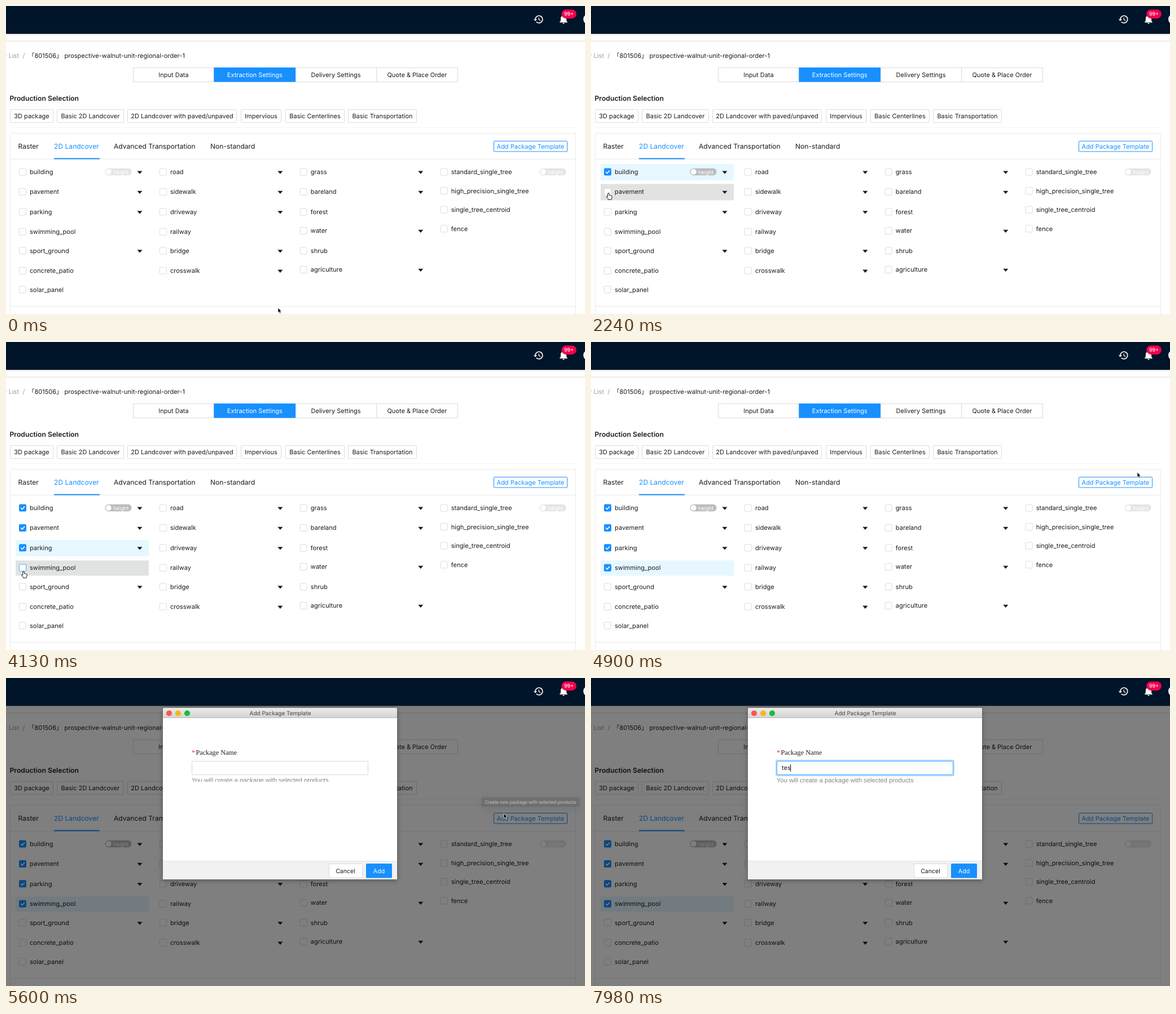
Write an HTML page that moves like this. It is 1026 by 546 pixels and loops after 8000 ms.

```html
<!DOCTYPE html>
<html lang="en">
<head>
<meta charset="utf-8">
<title>Package template</title>
<style>
  html, body { margin: 0; width: 100%; height: 100%; overflow: hidden; background: #fff; }
  svg { display: block; width: 100vw; height: 100vh; }
  text { font: 11px Inter, sans-serif; fill: #1c1c1c; white-space: pre; text-rendering: geometricPrecision; }
  .mid { text-anchor: middle; }
  .item { font-size: 11.1px; }
  .tab { font-size: 12.1px; }
  .head { font-size: 12.2px; font-weight: 600; }
  .small { font-size: 9.3px; fill: #fff; }
  .badge { font-size: 8.8px; font-weight: 500; }
  .title { font-size: 10px; fill: #444; }
  .action { font-size: 10.6px; }
  .cjk { font-family: Inter, "Noto Sans CJK SC", "Noto Sans CJK JP", sans-serif; }
  .serif { font: 12.2px "Liberation Serif", serif; }
  .hint { font: 11.3px "Liberation Sans", sans-serif; fill: #858585; }
  .blue { fill: #1890ff; }
  .gray { fill: #999; }
  .white { fill: #fff; }
  .red { fill: #f5222d; }
  .line { fill: none; stroke: #ebebeb; }
  .box { fill: #fff; stroke: #dcdcdc; }
  #modal { filter: drop-shadow(0 2px 4px #0005); }
  #tip { filter: drop-shadow(0 6px 8px #0002); }
  #tip text { font: 9.56px Roboto, sans-serif; fill: #fff; }
</style>
</head>
<body>
<svg id="stage" viewBox="0 0 1026 546"></svg>
<script>
const LOOP = 8000, STEP = 70;
const OPEN = 5390, FOCUS = 6440;
const CLICKS = [1890, 2310, 3570, 4340];   // first four rows, top to bottom
const TYPED = [[7630, 't'], [7700, 'te'], [7980, 'tes']];

// Pointer path: time, x, y
const PATH = [
  [0, 482, 535], [490, 32, 294], [630, 32, 293], [840, 32, 293], [1120, 32, 298],
  [1330, 39, 335], [1610, 34, 297], [1750, 31, 296], [1960, 31, 296], [2240, 31, 331],
  [2730, 31, 332], [3220, 31, 364], [3430, 31, 370], [3710, 31, 370], [4130, 31, 406],
  [4410, 32, 408], [4900, 968, 231], [5110, 948, 247], [5320, 935, 252], [5460, 935, 254],
  [5600, 882, 240], [5950, 470, 160], [FOCUS, 442, 160]
];

// ^ = expandable row, ~ = row with a height switch
const COLUMNS = [
  'building^~ pavement^ parking^ swimming_pool sport_ground^ concrete_patio solar_panel',
  'road^ sidewalk^ driveway^ railway bridge^ crosswalk^',
  'grass^ bareland^ forest water^ shrub agriculture^',
  'standard_single_tree~ high_precision_single_tree single_tree_centroid fence'
];

const text = (x, y, s, cls = '') => `<text x="${x}" y="${y}" class="${cls}">${s}</text>`;
const rect = (x, y, w, h, attrs = '') => `<rect x="${x}" y="${y}" width="${w}" height="${h}" ${attrs}/>`;
const clamp = v => Math.max(0, Math.min(1, v));
const ramp = (t, from, to) => clamp((t - from) / (to - from));
const smooth = v => v * v * (3 - 2 * v);
const inside = (p, r) => p.x >= r.x && p.x <= r.x + r.w && p.y >= r.y && p.y <= r.y + r.h;

const ADD = { x: 864, y: 239, w: 131, h: 19 };
const INPUT = { x: 329, y: 147, w: 313, h: 25 };
const rows = [];

function rowMarkup(name, x, y) {
  const caret = name.includes('^'), h = caret ? 29 : 27;
  const area = { x: x - 6, y: y + .6 - h / 2, w: 236, h };
  const sx = x + (caret ? 152.5 : 176);
  rows.push(area);
  return `<g class="row">${rect(area.x, area.y, area.w, area.h, 'class="back" fill="none"')}
    ${rect(x + .5, y - 6, 12, 12, 'rx="1.5" class="check"')}
    <path class="tick" d="M${x + 3.3} ${y}l2.5 2.6 4.2-5" fill="none" stroke="#fff" stroke-width="1.6"/>
    ${text(x + 19, y + 4, name.replace(/[\^~]/g, ''), 'item')}
    ${caret ? `<path d="M${x + 209.5} ${y - 1.6}h9l-4.5 5.3z" fill="#1c1c1c"/>` : ''}
    ${name.includes('~') ? rect(sx, y - 6.2, 47, 12.4, 'rx="6.2" class="switch"') +
      `<circle cx="${sx + 6.3}" cy="${y}" r="4.9" fill="#fff"/>` + text(sx + 14.5, y + 3.5, 'height', 'small') : ''}
  </g>`;
}

function listMarkup() {
  return COLUMNS.map((column, i) => {
    let y = 294;
    return column.split(' ').map(name => {
      const out = rowMarkup(name, 23 + i * 248.9, y);
      y += name.includes('^') ? 35.4 : 33.6;
      return out;
    }).join('');
  }).join('');
}

const steps = ['Input Data', 'Extraction Settings', 'Delivery Settings', 'Quote &amp; Place Order']
  .map((s, i) => rect(225.5 + i * 143.75, 109.5, 143.75, 25, 'class="box"') +
    (i === 1 ? rect(368.3, 109, 144.7, 25.6, 'fill="#1890ff"') : '') +
    text(297 + i * 143.8, 126, s, i === 1 ? 'mid white' : 'mid'));
steps.push(steps.splice(1, 1)[0]);   // active step on top of its neighbours

const chips = [[7, 84, '3D package'], [90, 209, 'Basic 2D Landcover'],
  [215, 409, '2D Landcover with paved/unpaved'], [416, 488, 'Impervious'],
  [495, 600, 'Basic Centerlines'], [606, 728, 'Basic Transportation']]
  .map(([a, b, s]) => rect(a + .5, 183.5, b - a - 1, 23, 'class="box" rx="1"') + text((a + b) / 2, 199, s, 'mid'));

const page = `
  ${rect(0, 0, 1026, 546, 'fill="#fff"')}
  <path d="M0 62.2H1026" stroke="#d9dfd3"/>
  <text x="23" y="92" class="gray" text-anchor="end">Order List</text>
  ${text(29.5, 92, '/', 'gray')}
  ${text(39.5, 92, '「801506」', 'cjk')}
  ${text(103.5, 92, 'prospective-walnut-unit-regional-order-1')}
  ${steps.join('')}
  ${text(6.5, 168, 'Production Selection', 'head')}
  ${chips.join('')}
  <path d="M7 215.5H1010" stroke="#f4f4f4"/>
  <path class="line" d="M7.5 546V225.5H1009.5V546M8 271.5H1009M8 532.5H1009"/>
  ${text(21.5, 253, 'Raster', 'tab')}${text(85, 253, '2D Landcover', 'tab blue')}
  ${text(191, 253, 'Advanced Transportation', 'tab')}${text(362, 253, 'Non-standard', 'tab')}
  ${rect(85, 269.6, 81, 2, 'fill="#1890ff"')}
  ${rect(864.5, 239.5, 130, 18.5, 'fill="#fff" stroke="#1890ff" rx="1"')}
  ${text(929.5, 253, 'Add Package Template', 'mid blue')}
  ${listMarkup()}`;

const header = `
  ${rect(0, 0, 1026, 49.5, 'fill="#001529"')}
  <g fill="#fff">
    <path transform="translate(934 14) scale(.8)" d="M13 3a9 9 0 0 0-9 9H1l3.9 4L9 12H6a7 7 0 1 1 2.06 4.94l-1.42 1.42A9 9 0 1 0 13 3zm-1 5v5l4.28 2.54.72-1.21-3.5-2.08V8z"/>
    <path transform="translate(977.8 13) scale(.85)" d="M12 22a2 2 0 0 0 2-2h-4a2 2 0 0 0 2 2zm6-6v-5c0-3.07-1.64-5.64-4.5-6.32V4a1.5 1.5 0 0 0-3 0v.68C7.63 5.36 6 7.92 6 11v5l-2 2v1h16v-1z"/>
    <circle cx="1033" cy="23.5" r="10"/>
  </g>
  ${rect(984.3, 6.2, 26.5, 16, 'rx="8" fill="#f5004f"')}
  ${text(997.5, 17.3, '99+', 'mid white badge')}`;

const modal = `
  <g id="modal">
    <path d="M278 357V56q0-3 3-3H690q3 0 3 3V357z" fill="#fff"/>
    <path d="M278 71V56q0-3 3-3H690q3 0 3 3V71z" fill="url(#bar)"/>
    <path d="M278 70.5H693" stroke="#b9b9b9"/>
    ${['#fc5650', '#fdb414', '#14c036'].map((c, i) => `<circle cx="${289 + i * 16}" cy="62.5" r="5.1" fill="${c}"/>`).join('')}
    ${text(486, 65.7, 'Add Package Template', 'mid title')}
    ${text(329, 135.5, '*', 'serif red')}
    ${text(336.5, 135.5, 'Package Name', 'serif')}
    ${rect(328, 146, 315, 27, 'rx="2" id="glow" fill="none" stroke="#1890ff" stroke-width="2.4"')}
    ${rect(329.5, 147.5, 312, 24, 'rx="1.5" id="input" fill="#fff"')}
    <text id="value" x="338" y="163"></text>
    ${rect(0, 153, 1, 13, 'id="caret" fill="#111"')}
    <g clip-path="url(#reveal)">${text(329, 185, 'You will create a package with selected products', 'hint')}</g>
    ${rect(278, 325, 415, 32, 'fill="#f1f1f1"')}<path d="M278 324.5H693" stroke="#e4e4e4"/>
    ${rect(572.5, 329.5, 59, 24.5, 'class="box" rx="1.5"')}${rect(638, 329, 46, 25.5, 'fill="#1890ff" rx="1.5"')}
    ${text(601.5, 345.8, 'Cancel', 'mid action')}${text(661, 345.8, 'Add', 'mid action white')}
  </g>`;

const $ = id => document.getElementById(id);
$('stage').innerHTML = `
  <defs>
    <linearGradient id="bar" x2="0" y2="1"><stop stop-color="#ebebeb"/><stop offset="1" stop-color="#d2d2d2"/></linearGradient>
    <clipPath id="reveal">${rect(320, 174, 300, 0, 'id="revealBox"')}</clipPath>
  </defs>
  ${page}
  ${rect(0, 49, 1026, 497, 'id="mask"')}
  ${header}${modal}
  <g id="tip">${rect(830, 208, 199, 20.5, 'rx="2" fill="#616161" fill-opacity=".93"')}
    ${text(929.5, 221.8, 'Create new package with selected products', 'mid')}</g>
  <g id="cursor">
    <path id="arrow" d="M0 0V8.8L2 7 3.5 10.2 5 9.5 3.6 6.4H6.3z" fill="#000" stroke="#fff" stroke-width=".7"/>
    <path id="hand" d="M-1.3 1.2Q0-.6 1.2 1.2L1.3 4.4Q2.4 3.8 3 4.9 4.2 4.4 4.8 5.5 6.2 5.3 6.2 6.8 6.3 9.5 5 12.2H-.2Q-1.2 9.8-3.6 7.4-3.6 5.8-1.3 7.2z" fill="#fff" stroke="#111"/>
    <path id="beam" d="M-2.2-6.5Q0-6.5 0-5 0-6.5 2.2-6.5M0-5V5M-2.2 6.5Q0 6.5 0 5 0 6.5 2.2 6.5" fill="none" stroke="#111"/>
  </g>`;

const rowEls = [...document.querySelectorAll('.row')].map(g => ({
  back: g.querySelector('.back'), check: g.querySelector('.check'),
  tick: g.querySelector('.tick'), toggle: g.querySelector('.switch')
}));

const set = (el, attrs) => { for (const k in attrs) el.setAttribute(k, attrs[k]); };
const show = (el, on) => set(el, { visibility: on ? 'visible' : 'hidden' });

function pointer(t) {
  const i = PATH.findIndex(p => p[0] > t);
  if (i < 0) return { x: PATH.at(-1)[1], y: PATH.at(-1)[2] };
  const [t0, x0, y0] = PATH[i - 1], [t1, x1, y1] = PATH[i];
  const k = smooth(ramp(t, t0, t1));
  return { x: x0 + (x1 - x0) * k, y: y0 + (y1 - y0) * k };
}

const rowAt = t => t < OPEN ? rows.findIndex(r => inside(pointer(t), r)) : -1;

function draw(t) {
  const pos = pointer(t), open = t >= OPEN;
  const hover = rowAt(t), lit = rowAt(Math.max(0, t - 140));   // borders react late
  const active = CLICKS.filter(c => t >= c).length - 1;

  rowEls.forEach((el, i) => {
    const on = i <= active;
    set(el.back, { fill: i === active ? '#e6f7ff' : i === hover ? '#e1e3e2' : 'none' });
    set(el.check, {
      fill: on ? '#1890ff' : '#fff',
      stroke: on ? '#1890ff' : i === lit ? '#52adff' : '#dcdcdc'
    });
    show(el.tick, on);
    if (el.toggle) set(el.toggle, { fill: on ? '#bcbcbc' : '#e5e5e5' });
  });

  const fade = ramp(t, OPEN, 5600) ** 1.35;
  set($('mask'), { opacity: fade * .5 });
  set($('modal'), { opacity: fade });
  set($('revealBox'), { height: 20 * ramp(t, 5460, 5740) });

  const grow = ramp(t, 5040, 5250), leave = ramp(t, 5460, 5740);
  const size = .8 + .2 * smooth(grow) - .25 * leave;
  set($('tip'), {
    opacity: grow * (1 - leave),
    transform: `translate(929.5 229) scale(${size}) translate(-929.5 -229)`
  });

  const overInput = open && inside(pos, INPUT);
  set($('input'), { stroke: overInput || t >= FOCUS ? '#40a9ff' : '#d9d9d9' });
  set($('glow'), { opacity: .3 * ramp(t, FOCUS, 6650) });
  const value = $('value');
  value.textContent = TYPED.filter(([at]) => t >= at).map(([, s]) => s).pop() || '';
  set($('caret'), { x: 338 + (value.textContent ? value.getComputedTextLength() - .5 : 0) });
  show($('caret'), t >= FOCUS && (t < 7000 || t >= 7490));

  const kind = overInput ? 'beam' : !open && (hover >= 0 || inside(pos, ADD)) ? 'hand' : 'arrow';
  set($('cursor'), { transform: `translate(${pos.x} ${pos.y})` });
  for (const id of ['arrow', 'hand', 'beam']) show($(id), id === kind && t < TYPED[0][0]);
}

const start = performance.now();
function tick(now) {
  const t = Math.max(0, now - start) % LOOP;
  draw(Math.floor(t / STEP) * STEP);
  requestAnimationFrame(tick);
}
draw(0);
requestAnimationFrame(tick);
</script>
</body>
</html>
```
